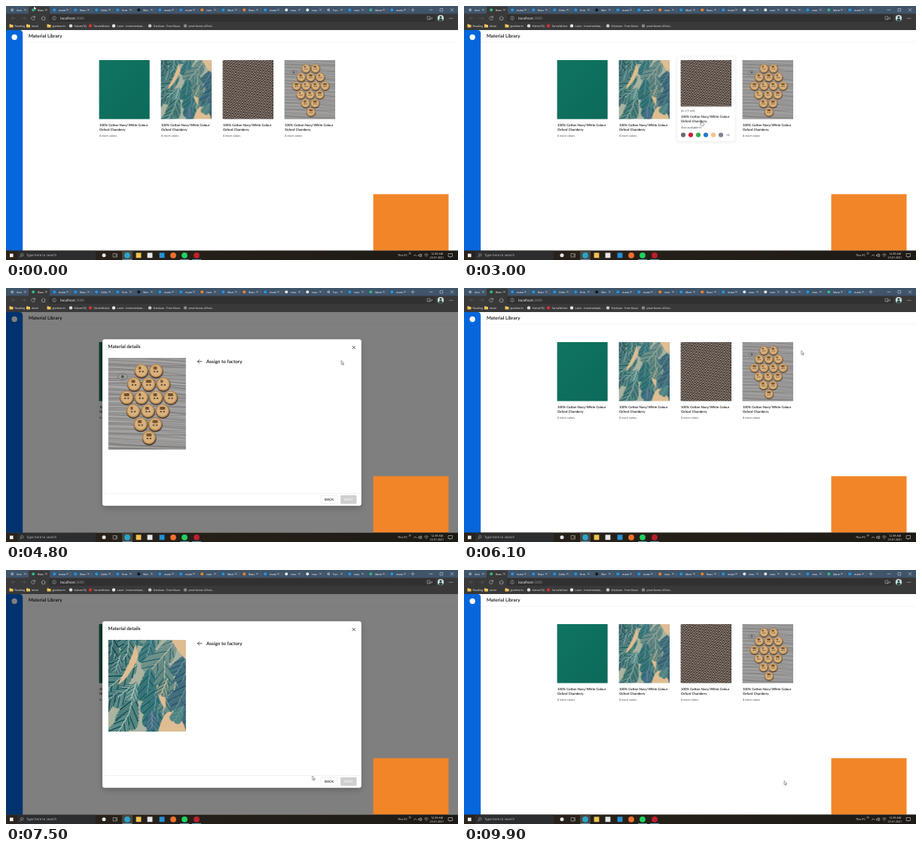
Write an HTML page that moves like this. It is 600x338 px and loops after 10 s.

```html
<!DOCTYPE html>
<html lang="en">
<head>
<meta charset="utf-8">
<title>Material Library</title>
<style>
html, body { margin: 0; width: 100%; height: 100%; overflow: hidden; background: #fff; }
svg { display: block; width: 600px; height: 338px; }
text { font-family: Lato, sans-serif; text-rendering: geometricPrecision; }
.ui text { font-family: "Open Sans", sans-serif; }
.line { fill: none; stroke-linecap: round; stroke-linejoin: round; }
</style>
</head>
<body>
<svg id="stage" viewBox="0 0 600 338" xmlns="http://www.w3.org/2000/svg"></svg>
<script>
const LOOP = 10000;
let seed = 11;
const rnd = (a = 0, b = 1) => a + (b - a) * (seed = seed * 16807 % 2147483647) / 2147483647;
const rep = (n, f) => Array.from({ length: n }, (_, i) => f(i)).join('');
const rect = (x, y, w, h, fill, more = '') =>
  `<rect x="${x}" y="${y}" width="${w}" height="${h}" fill="${fill}" ${more}/>`;
const dot = (x, y, r, fill, more = '') => `<circle cx="${x}" cy="${y}" r="${r}" fill="${fill}" ${more}/>`;
const text = (x, y, str, size, fill = '#111', more = '') =>
  `<text x="${x}" y="${y}" font-size="${size}" fill="${fill}" ${more}>${str}</text>`;
const line = (d, color, w = .5, more = '') =>
  `<path class="line" d="${d}" stroke="${color}" stroke-width="${w}" ${more}/>`;
const BOLD = 'font-weight="600"', MID = 'text-anchor="middle"';

// Fabric pictures, drawn on a 103 x 122 field
function frond(x, y, len, angle, dark, light) {
  let blades = '', veins = '';
  for (let i = 0; i <= 14; i++) {
    const p = i / 14 * len, w = len * .4 * Math.sin(Math.PI * (.16 + .76 * i / 14));
    for (const s of [-1, 1]) {
      const d = `M${p.toFixed(1)} 0q${(w * .4).toFixed(1)} ${(s * w * .35).toFixed(1)} ${(w * 1.1).toFixed(1)} ${(s * w * .85).toFixed(1)}`;
      blades += d;
      if ((i + s) % 4) veins += d;
    }
  }
  return `<g transform="translate(${x.toFixed(1)} ${y.toFixed(1)}) rotate(${angle.toFixed(0)})">` +
    line(blades, dark, 1.8) + line(veins, light, .75, 'opacity=".8" transform="translate(.6 0)"') +
    line(`M0 0H${len.toFixed(1)}`, light, .9) + '</g>';
}
function leaves() {
  const darks = ['#174a52', '#1f6464', '#2c5670', '#1b5a5b', '#3d7477'];
  const lights = ['#a3c4bd', '#c6d6cb', '#7fa5b2', '#d9cbb0', '#6f9f98'];
  const leaf = (x, y, i) => frond(x, y, rnd(32, 46), rnd(85, 140), darks[i * 3 % 5], lights[i % 5]);
  const gaps = 'M36 6Q30 30 12 60 26 54 40 22ZM84 0H103V26Q92 16 84 0ZM64 60Q78 66 76 92 66 82 64 60ZM66 122Q74 92 84 96 100 104 103 122Z';
  return rect(0, 0, 103, 122, '#a9b3a0') +
    rep(35, i => leaf(i % 5 * 26 + rnd(-4, 14), (i / 5 | 0) * 20 - 26 + rnd(-7, 7), i)) +
    `<path d="${gaps}" fill="#dfbd92"/>` +
    rep(5, i => frond(16 + i * 21, 20 + i * 37 % 80, 22, rnd(85, 130), darks[i], lights[i]));
}
const tweed = () => rect(0, 0, 103, 122, '#352b29') + rect(0, 0, 103, 122, 'url(#weave)');
function buttons() {
  const grain = rep(60, i => {
    const y = i * 2.2 - 8;
    return line(`M0 ${y.toFixed(1)}q${rnd(20, 45).toFixed(0)} ${rnd(-3, 4).toFixed(1)} 103 ${rnd(3, 9).toFixed(1)}`,
      i % 3 ? '#6b6a6a' : '#c2c0bf', rnd(.3, 1.2).toFixed(2), 'opacity=".6"');
  });
  const mids = [53.5, 53.5, 53.5, 52.5, 52.5, 54];
  const discs = [2, 3, 4, 3, 2, 1].map((n, row) => rep(n, i => {
    const x = mids[row] + (i - (n - 1) / 2) * 19.4, y = 17 + row * 17.8;
    return dot(x + .3, y + 1, 9.5, '#40352d') + dot(x, y, 9, '#b88850') + dot(x, y - .2, 7.6, '#d8b17d') +
      rect(x - 3.5, y - 5.5, 3 + (i + row) % 3 * 2, 4, '#76502f', 'rx="1"') +
      rep(2, k => dot(x - 2 + k * 4, y + 1.2, 1, '#352318'));
  })).join('');
  return rect(0, 0, 103, 122, '#9d9b9a') + grain +
    `<ellipse cx="19" cy="25" rx="6" ry="4" fill="#a5a3a0" stroke="#6b6967"/>` + dot(19, 25, 2.2, '#5a5856') + discs;
}
const arts = [() => rect(0, 0, 103, 122, 'url(#green)'), leaves, tweed, buttons];
const defs = `<defs>
  <linearGradient id="green" x2="1" y2="1"><stop stop-color="#107462"/><stop offset="1" stop-color="#0c6a59"/></linearGradient>
  <linearGradient id="bar"><stop stop-color="#2b231c"/><stop offset="1" stop-color="#1d1a15"/></linearGradient>
  <pattern id="weave" width="5.6" height="5.6" patternUnits="userSpaceOnUse" patternTransform="rotate(8)">
    <ellipse cx="1.4" cy="1.4" rx="1.6" ry="1.2" fill="#d3c6b9"/><ellipse cx="4.2" cy="4.2" rx="1.6" ry="1.2" fill="#bcaa9b"/>
    <circle cx="4.2" cy="1.4" r=".8" fill="#806656"/><circle cx="1.4" cy="4.2" r=".9" fill="#1f1818"/>
  </pattern>
  <clipPath id="thumb"><rect width="67" height="78.5"/></clipPath>
  <clipPath id="photo"><rect width="103" height="122"/></clipPath>
  <filter id="soft" x="-20%" y="-20%" width="140%" height="140%"><feDropShadow dx="0" dy="1" stdDeviation="2" flood-opacity=".08"/></filter>
  <filter id="deep" x="-10%" y="-10%" width="120%" height="125%"><feDropShadow dx="0" dy="3" stdDeviation="4" flood-opacity=".22"/></filter>
  ${rep(4, i => `<g id="art${i}" clip-path="url(#photo)">${arts[i]()}</g>`)}</defs>`;

function card(i) {
  const swatches = ['#6c6b76', '#cb1f38', '#3cab49', '#2a78cd', '#f4c389', '#87808d'];
  return `<g class="card" transform="translate(${123.6 + 82 * i} 72)">
    <g class="on">${rect(-5, -5, 77.5, 113, '#fff', 'stroke="#e8e8e8" stroke-width=".5" rx="1" filter="url(#soft)"')}</g>
    <g clip-path="url(#thumb)"><g class="pic"><use href="#art${i}" transform="scale(.651)"/></g></g>
    <g class="cover">${rect(-1, 78.5, 69, 17, '#fff')}</g>
    <g class="name">${text(.3, 87.8, '100% Cotton Navy/White Colour', 4.38, '#111', BOLD)}
      ${text(.3, 94.1, 'Oxford Chambery', 4.38, '#111', BOLD)}</g>
    <g class="off">${text(.3, 102.4, '8 more colors', 3.9, '#555')}</g>
    <g class="on">${text(.3, 68.6, 'ID: CT-698', 3.8, '#555')}${text(.3, 91.2, 'Also available in', 3.95, '#555')}
      ${swatches.map((c, k) => dot(3.4 + 10 * k, 99.5, 3.1, c)).join('')}${text(60.3, 100.8, '+2', 3.9, '#333')}</g>
  </g>`;
}

function browser() {
  const tabs = 'Assi Reac mate Reac Defa firm Wor mate mate reac Mod Reac mate reac reac Fun reac Mate mate'.split(' ');
  const tint = { b: '#2595dd', w: '#e2e5e8', k: '#15181b', o: '#e88432', g: '#35b58d', s: '#8a9bab' };
  const icons = 'sgbbbbkbbobobwwsbgb';
  const tabRow = tabs.map((s, i) => {
    const x = 2 + 28 * i;
    return (i === 1 ? rect(x, .8, 28, 10, '#393939', 'rx="1.5"') : line(`M${x + 28} 3V8`, '#7a8896', .3)) +
      dot(x + 6.2, 5.2, 2, tint[icons[i]]) + text(x + 12, 6.5, s, 3.7, '#fff') +
      line(`M${x + 22.3} 4l2.2 2.2m0-2.2l-2.2 2.2`, '#f0f3f5', .45);
  }).join('');
  const marks = [[7, 'Reading'], [29.5, 'okvel'], [57, 'gladmorin'], [86, 'HalvenTQ', '#dcdcdc'], [112, 'TarnoWicket', '#cf3434'],
    [143, 'Later - Intermediate...', '#e8e8e8'], [191, 'Ostelvan - Free Music', '#c9c9c9'], [238, 'prod-forest-x55e4...', '#8a8a8a']];
  const markRow = marks.map(([x, s, c]) => (c ? dot(x, 26.4, 2.2, c)
    : `<path d="M${x - 2.5} 24.2h2l.7.7h2.3v3.6h-5z" fill="#f0c65a"/>`) + text(x + 4.6, 27.7, s, 3.6, '#f4f4f4')).join('');
  return `<g class="ui">${rect(0, 0, 600, 11, '#40546a')}${rect(0, 10.3, 600, 21.7, '#393939')}${tabRow}
    ${line('M540 3v4.4m-2.2-2.2h4.4M562 5.2h4M590.3 3.4l3.6 3.6m0-3.6l-3.6 3.6M576.4 3.5h3.4v3.4h-3.4z', '#f0f3f5', .45)}
    ${rect(57, 11.6, 513, 9.4, '#303030', 'rx="2"')}
    ${line('M12.5 16.2h-5m2-2l-2 2 2 2M21 16.2h5m-2-2l2 2-2 2', '#686868')}
    ${line('M38.2 15a2.4 2.4 0 1 0 .2 2M38.4 13.4V15.2h-1.8M47 16l2.7-2.4 2.7 2.4M47.8 15.6v3h3.8v-3', '#d2d2d2')}
    ${line('M64 15.8v1.8m0-3v.1', '#c8c8c8')}${dot(64, 16.2, 2.5, 'none', 'stroke="#c8c8c8" stroke-width=".4"')}
    ${text(72, 17.9, 'localhost<tspan fill="#999">:3000</tspan>', 4.75, '#fff')}
    ${line('M559.5 14h3.5v4h-3.5zm2 3h4v-2', '#cfcfcf')}
    ${dot(577, 16.2, 4.1, '#d5dedd')}<path d="M574.5 19.3q0-2.8 2.5-2.8t2.5 2.8q-2.4 1.8-5 0z" fill="#234c49"/>${dot(577, 14.7, 1.5, '#234c49')}
    ${rep(3, i => dot(588.8 + i * 2, 16.2, .5, '#ddd'))}${markRow}</g>`;
}

function taskbar() {
  const apps = [[161, '#29a5cc'], [176, '#efc452'], [191, '#e5e7e8'], [207, '#2590d6'], [222, '#f0702c'], [237, '#1fd160'], [253, '#bd202c']];
  return `<g class="ui">${rect(0, 325.4, 600, 12.6, 'url(#bar)')}${rect(15, 325.8, 104, 12.2, '#2b2d2e')}
    ${rect(5, 329.6, 4.6, 4.6, '#eef2f4')}${dot(21.3, 331.2, 1.7, 'none', 'stroke="#d0d0d0" stroke-width=".5"')}${line('M20 332.5l-1.6 1.7', '#d0d0d0')}
    ${text(27, 333.3, 'Type here to search', 4.4, '#c4c4c4')}
    ${dot(130, 331.8, 2.5, '#e4e6e7')}
    ${line('M142.5 329.5h3.6v4.6h-3.6zM147.4 329.5v4.6', '#dcdcdc')}
    ${rect(154, 325.6, 14, 12.4, '#4a463f')}
    ${apps.map(([x, c], i) => (i > 0 && i < 4 ? rect(x - 3.4, 328.4, 6.8, 6.8, c) : dot(x, 331.8, 3.9, c)) +
      (i === 0 || i > 4 ? rect(x - 6, 337.2, 12, .8, '#6fb7dd') : '')).join('')}
    ${text(520, 333, 'This PC', 3.8, '#f0f0f0')}
    ${line('M535 328.2l1 1-1 1m1.5-2l1 1-1 1M541.4 332.6l1.8-1.8 1.8 1.8M548 331h1l1.3-1.3v4.2l-1.3-1.3h-1zM551.6 330.3q1 1.5 0 3M555.5 330.6q2.4-2 4.8 0m-3.8 1.6q1.4-1 2.8 0M557.9 333.8v.1', '#f0f0f0')}
    ${text(572, 330.7, '12:39 AM', 3.7, '#fff', MID)}${text(572, 336.3, '25-01-2021', 3.6, '#fff', MID)}
    ${line('M587.5 329.5h5v4h-2l-1 1.2v-1.2h-2z', '#f0f0f0')}</g>`;
}

const modal = `<g id="modal">${rect(0, 32, 600, 293.4, '#000', 'opacity=".5"')}
  ${rect(128, 68.2, 343.7, 221.5, '#fff', 'rx="3" filter="url(#deep)"')}
  ${text(135.6, 80.3, 'Material details', 6.3, '#111', BOLD)}
  ${line('M459.8 77.3l3.6 3.6m0-3.6l-3.6 3.6', '#222', .75)}
  <g transform="translate(135.8 93)"><g id="shotA"><use href="#art3"/></g><g id="shotB"><use href="#art1"/></g></g>
  ${line('M260 97.8h-5.6m2.3-2.3l-2.3 2.3 2.3 2.3', '#222', .75)}
  ${text(266, 100, 'Assign to factory', 6.35, '#111', BOLD)}
  ${line('M128 273.4H471.7', '#e4e4e4', .5)}
  ${rect(418, 276, 22, 11, '#fff', 'rx="1" stroke="#d9d9d9" stroke-width=".5"')}${text(429, 283.2, 'BACK', 4.5, '#222', BOLD + ' ' + MID)}
  ${rect(444, 275.8, 21.4, 11.4, '#cfcfcf', 'rx="1"')}${text(454.7, 283.2, 'NEXT', 4.5, '#f7f7f7', BOLD + ' ' + MID)}</g>`;

const cursor = `<g id="cursor" stroke="#111" stroke-width=".4" stroke-linejoin="round" fill="#fff">
  <path id="arrow" d="M0 0V5.3L1.2 4.2 2 6.1 2.9 5.7 2.1 3.9H3.8Z"/>
  <path id="hand" d="M-.6 .3Q0-.5 .5 .3V2.2Q1.2 1.8 1.5 2.4 2.2 2.1 2.5 2.7 3.2 2.5 3.3 3.2V4.6L2.6 6.3H-.2L-1.8 3.9Q-1.7 3-.6 3.8Z"/></g>`;

document.getElementById('stage').innerHTML = defs + rect(0, 0, 600, 338, '#fff') +
  line('M22 48.2H600', '#ebebeb', .5) +
  '<path d="M0 32H18Q22.2 32 22.2 36.5V326H0Z" fill="#0666dc"/>' + dot(11.2, 41.5, 3.7, '#fff') +
  text(30, 42.4, 'Material Library', 6.35, '#111', BOLD) + rep(4, card) + modal +
  rect(487.5, 250.4, 100, 75.2, '#f28528') + browser() + taskbar() + cursor;

// Motion, all times in ms
const $ = id => document.getElementById(id);
const play = (el, steps) => el.animate(
  steps.map(([t, css]) => ({ offset: t / LOOP, ...css })), { duration: LOOP, iterations: Infinity });

function toggle(el, spans, off, on, rise = 200) {
  play(el, [[0, off],
    ...spans.flatMap(([a, b]) => [[a, off], [a + rise, on], [b, on], [b + rise, off]]),
    [LOOP, off]]);
}
const show = (el, spans, rise) => toggle(el, spans, { opacity: 0 }, { opacity: 1 }, rise);
const hide = (el, spans, rise) => toggle(el, spans, { opacity: 1 }, { opacity: 0 }, rise);
const lift = (el, spans, dy) => toggle(el, spans,
  { transform: 'translateY(0px)' }, { transform: `translateY(${dy}px)` });

const hovers = [[[1450, 1980]], [[2080, 2530], [6550, 6950]], [[2600, 3150]], [[3220, 3950]]];
document.querySelectorAll('.card').forEach((el, i) => {
  const all = s => el.querySelectorAll(s);
  all('.on').forEach(e => show(e, hovers[i]));
  all('.off').forEach(e => hide(e, hovers[i]));
  all('.pic').forEach(e => lift(e, hovers[i], -8));
  all('.cover').forEach(e => lift(e, hovers[i], -16.7));
  all('.name').forEach(e => lift(e, hovers[i], -11.3));
});

show($('modal'), [[3920, 5800], [6920, 9000]], 225);
hide($('shotA'), [[6500, 9500]], 1);
show($('shotB'), [[6500, 9500]], 1);

const pointing = [[1450, 3950], [5150, 5900], [6550, 6980], [7750, 9790]];
hide($('arrow'), pointing, 1);
show($('hand'), pointing, 1);

const path = [[0, 37, 0], [90, 37, 0], [700, 88, 92], [1000, 88, 92], [1800, 164, 146.5], [2000, 190, 150],
  [2300, 240, 151], [2500, 246, 151], [3000, 315, 153], [3500, 396, 140], [3900, 396, 140], [4400, 425, 116],
  [4600, 425, 116], [4800, 445, 96.5], [5300, 461, 78], [5800, 461, 78], [6100, 448, 83.3], [6750, 246, 118],
  [6900, 246, 118], [7500, 406.6, 274], [7900, 426, 281], [8100, 425, 280.4], [LOOP, 425, 280.4]];
play($('cursor'), path.map(([t, x, y]) => [t, { transform: `translate(${x}px, ${y}px)` }]));
</script>
</body>
</html>
```
